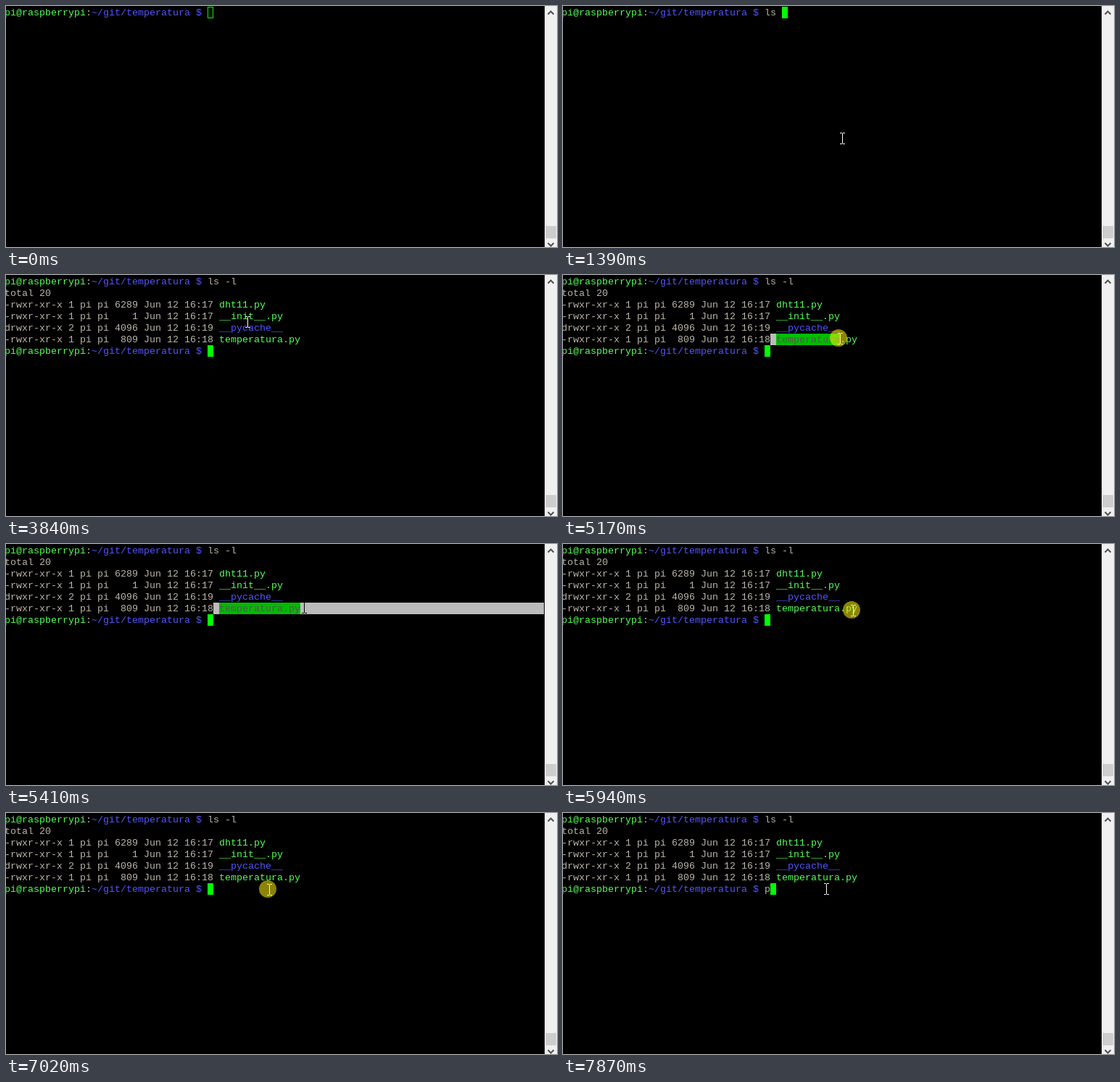
These frames come from a looping animation (760 by 333 pixels, 8000 ms). An HTML page:

```html
<!DOCTYPE html>
<html lang="en">
<head>
<meta charset="utf-8">
<title>Terminal session</title>
<style>
  html, body { margin: 0; width: 100%; height: 100%; overflow: hidden; background: #000; }
  svg { display: block; }
  text {
    font: 13.333px "Liberation Mono", "Courier New", monospace;
    white-space: pre;
    fill: #bbb4a8;
  }
  .user { fill: #55ff55; }
  .dir { fill: #5555ff; }
  .inverse { fill: #555; }
  .arrow { fill: none; stroke: #505050; stroke-width: 2; }
</style>
</head>
<body>
<svg width="760" height="333" viewBox="0 0 760 333">
  <rect width="760" height="333"/>
  <g id="first"></g>
  <g id="output"></g>
  <g id="pick">
    <clipPath id="pickClip"><rect id="pickArea" x="286" y="81" height="16"/></clipPath>
    <g clip-path="url(#pickClip)">
      <rect x="286" y="81" width="456" height="16" fill="#bbb"/>
      <rect x="294" y="81" width="112" height="16" fill="#0b0"/>
      <text class="inverse" x="294" y="93">temperatura.py</text>
    </g>
  </g>
  <rect id="blank" y="113" width="742" height="16" fill="#bbb"/>
  <rect id="cursor" width="8" height="16" fill="#0f0"/>
  <rect id="hollow" x="278.5" y="1.5" width="7" height="15" fill="none" stroke="#0f0"/>
  <text id="typed" x="278"></text>
  <g id="mouse">
    <path id="beam" shape-rendering="crispEdges"
      d="M-3-8h3v1h1v-1h3v1h-3v14h3v1h-3v-1h-1v1h-3v-1h3v-14h-3z"/>
    <circle id="halo" cx="-2" cy="-1" r="12" fill="#fff010" fill-opacity=".55"/>
  </g>
  <rect x="743" width="17" height="333" fill="#fff"/>
  <rect x="744" width="16" height="333" fill="#f0f0f0"/>
  <rect x="744" y="304" width="15" height="17" fill="#cdcdcd"/>
  <path class="arrow" d="M747.5 11.5l4-4 4 4M747.5 327.5l4 4 4-4"/>
</svg>
<script>
const LOOP = 8000, STEP = 77, ENTER = 2520;
const CELL = 8, ROW = 16, LEFT = -2, RIGHT = 742;
const $ = id => document.getElementById(id);
const show = (id, on) => $(id).setAttribute("visibility", on ? "visible" : "hidden");
const span = (kind, text) => `<tspan class="${kind}">${text}</tspan>`;
const line = (row, html) => `<text x="${LEFT}" y="${13 + row * ROW}">${html}</text>`;

const prompt = span("user", "pi@raspberrypi") + ":" + span("dir", "~/git/temperatura $ ");
const files = [
  ["-rwxr-xr-x 1 pi pi 6289 Jun 12 16:17 ", "user", "dht11.py"],
  ["-rwxr-xr-x 1 pi pi    1 Jun 12 16:17 ", "user", "__init__.py"],
  ["drwxr-xr-x 2 pi pi 4096 Jun 12 16:19 ", "dir", "__pycache__"],
  ["-rwxr-xr-x 1 pi pi  809 Jun 12 16:18 ", "user", "temperatura.py"]
];
$("first").innerHTML = line(0, prompt);
$("output").innerHTML = line(0, " ".repeat(35) + "ls -l") + line(1, "total 20") +
  files.map(([info, kind, name], i) => line(i + 2, info + span(kind, name))).join("") +
  line(6, prompt);

const keys = [
  { at: 1230, key: "l" }, { at: 1310, key: "s" }, { at: 1390, key: " " },
  { at: 2100, key: "-" }, { at: 2270, key: "l" }, { at: 7870, key: "p" }
];
const presses = [
  { from: 300, to: 530 },
  { from: 5020, to: 5410 },
  { from: 5860, to: 6020 },
  { from: 6330, to: 6480 },
  { from: 6940, to: 7170 }
];
// The pointer rests between legs and runs straight to x, y during each.
const legs = [
  { from: 70, to: 70, x: 470, y: 245 },
  { from: 150, to: 150, x: 395, y: 206 },
  { from: 300, to: 450, x: 385, y: 183 },
  { from: 3300, to: 3680, x: 327, y: 40 },
  { from: 3760, to: 3840, x: 333, y: 65 },
  { from: 3940, to: 4010, x: 348, y: 66 },
  { from: 4180, to: 4790, x: 294, y: 89 },
  { from: 5020, to: 5250, x: 411, y: 88 },
  { from: 5710, to: 5940, x: 400, y: 92 },
  { from: 6020, to: 6330, x: 368, y: 127 },
  { from: 6710, to: 6940, x: 363, y: 106 },
  { from: 7320, to: 7320, x: 363, y: 105 }
];

function pointerAt(t) {
  const i = legs.findLastIndex(leg => t >= leg.from);
  if (i < 0) return null;
  const b = legs[i], a = legs[i - 1] || b;
  const steps = Math.floor((t - b.from) / STEP + 0.2) + 1;
  const u = Math.min(1, steps * STEP / (b.to - b.from + STEP));
  const mix = (p, q) => Math.round(p + (q - p) * u);
  return { x: mix(a.x, b.x), y: mix(a.y, b.y) };
}

// Right edge of the dragged selection; past the name it takes the whole row.
function pickEnd(t, x) {
  if (t < 5020 || t >= 5860) return 0;
  return t >= 5250 ? RIGHT : LEFT + Math.round((x - LEFT) / CELL) * CELL;
}

function draw(t) {
  const entered = t >= ENTER, row = entered ? 6 : 0, focused = t >= 300;
  const typed = keys.filter(k => k.at <= t && (k.at > ENTER) === entered)
    .map(k => k.key).join("");
  show("output", entered);
  $("typed").textContent = typed;
  $("typed").setAttribute("y", 13 + row * ROW);
  $("cursor").setAttribute("x", 278 + typed.length * CELL);
  $("cursor").setAttribute("y", 1 + row * ROW);
  show("cursor", focused);
  show("hollow", !focused);

  const pointer = pointerAt(t), { x, y } = pointer || { x: 0, y: 0 };
  const end = pickEnd(t, x), blank = t >= 6400 && t < 6940;
  show("pick", end);
  $("pickArea").setAttribute("width", Math.max(0, end - 286));
  show("blank", blank);

  show("beam", pointer);
  show("halo", presses.some(p => t >= p.from && t < p.to));
  $("mouse").setAttribute("transform", `translate(${x} ${y})`);
  const onGrey = (blank && y >= 113) || x < end;
  $("beam").setAttribute("fill", onGrey ? "#000" : "#fff");
}

function tick() {
  draw(performance.now() % LOOP);
  requestAnimationFrame(tick);
}
tick();
</script>
</body>
</html>
```
